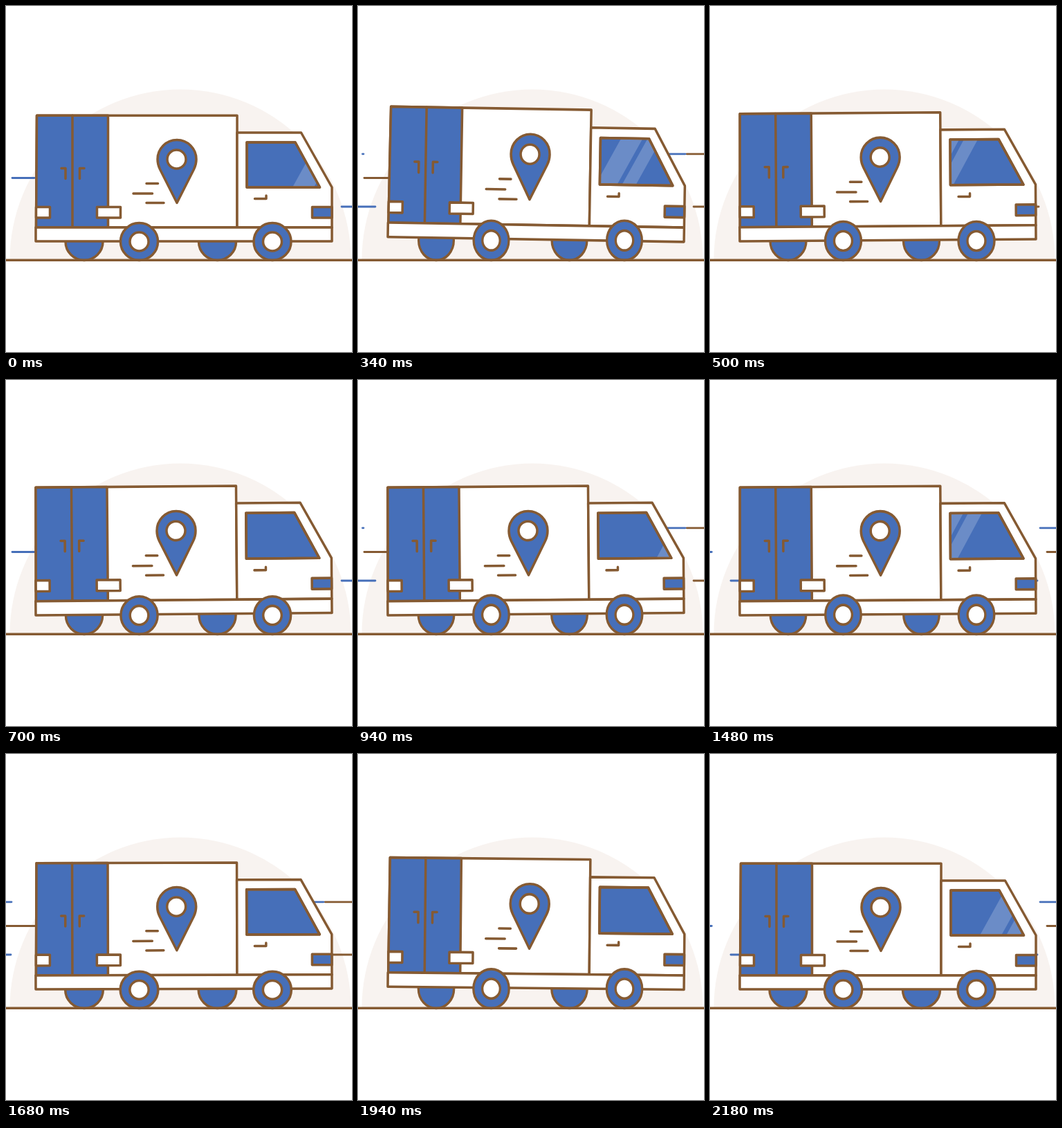
Animation, 500 px wide and 500 px high, one loop 2220 ms. Source, as an HTML page:

```html
<!DOCTYPE html>
<html lang="en">
<head>
<meta charset="utf-8">
<title>Delivery van</title>
<style>
  html, body { margin: 0; width: 100%; height: 100%; overflow: hidden; background: #fff; }
  svg { display: block; width: 100%; height: 100%; }
  .ink { stroke: #855a32; stroke-width: 3.5; stroke-linecap: round; stroke-linejoin: round; }
  .blue { fill: #466fb9; }
  .white { fill: #fff; }
  .none { fill: none; }
  .dash { stroke-width: 2.8; stroke-linecap: round; }
</style>
</head>
<body>
<svg viewBox="0 0 500 500">
  <defs>
    <clipPath id="pane"><path d="M348 197H418L453.5 262H348Z"/></clipPath>
  </defs>

  <path d="M5.5 367a246.5 246.5 0 0 1 493 0Z" fill="#f8f3f0"/>
  <g id="dashes"></g>

  <g class="ink blue">
    <circle class="wheel" cx="113" cy="340.5" r="27"/>
    <circle class="wheel" cx="305.5" cy="340.5" r="27"/>
  </g>

  <g id="body" class="ink">
    <path class="white" d="M44.5 158.300H334V320H43.500Z"/>
    <path class="blue" d="M44.5 158.300H147.500V320H43.500Z"/>
    <path class="none" d="M96 158.300V320M80 234.500H86V249.500M113 234.500H106.500V249.500"/>
    <path class="white" d="M43.500 290.500H63.500V306H43.500ZM131.500 290.500H165.500V306H131.500Z"/>

    <path class="blue" d="M247 284.500L222.500 236Q219 229 219 221.500a28 28 0 0 1 56 0Q275 229 271.500 236Z"/>
    <circle class="white" cx="246.500" cy="221.500" r="13.500"/>
    <path class="none" d="M203 256.500H219.500M184 271H211.500M203 284.500H228"/>

    <path class="white" d="M334 183H426.500L471 262V320H334Z"/>
    <path class="blue" d="M348 197H418L453.500 262H348Z"/>
    <g clip-path="url(#pane)" stroke="none">
      <path id="glare" d="M0 262h31l36 -65h-31ZM38 262h20l36 -65h-20Z" fill="#fff" fill-opacity=".2"/>
    </g>
    <path class="none" d="M348 197H418L453.500 262H348Z"/>
    <path class="none" d="M359.500 278.500H376V274"/>
    <path class="blue" d="M442.500 290.500H471V306H442.500Z"/>
    <path class="white" d="M43 320H471V340H43Z"/>
  </g>

  <g class="ink">
    <g class="wheel"><circle class="blue" cx="192.500" cy="340.500" r="27"/><circle class="white" cx="192.500" cy="340.500" r="13.500"/></g>
    <g class="wheel"><circle class="blue" cx="385" cy="340.500" r="27"/><circle class="white" cx="385" cy="340.500" r="13.500"/></g>
  </g>
  <path class="ink" d="M-4 367.300H504"/>
</svg>

<script>
const LOOP = 2220, STEP = 40, GROUND = 368;
const BLUE = '#466fb9', BROWN = '#855a32';

// Each run starts at a time and step, then rests on its last step.
const runs = [[0, 0, 6], [340, 6, 24], [1400, 30, 11], [1940, 41, 7]];

// Sway cycle: phase, tilt in degrees, body stretch, wheel stretch
const SWAY = 11.25;
const sway = [
  [0, 0, 0, 0], [2, 0, 0, 0],
  [3.25, -.15, .003, -.012], [3.75, -.48, .016, .015],
  [5, .9, .036, .05], [5.6, 1.02, .04, .06], [6, .95, .037, .06],
  [6.5, .88, .031, .05], [9.75, -.48, .016, .045], [SWAY, 0, 0, 0]
];

// Wind dashes: y, colour, front x at phase, phase, speed, length, right limit
const WIND = 15;
const wind = [
  [248.5, BLUE, 8, 0, 19.3, 34],
  [248.5, BROWN, 8, 6, 25, 70],
  [290, BLUE, 29, 2, 18, 69],
  [213.8, BLUE, 5.5, 6, 14, 40, 9],
  [213.8, BROWN, 530, 2, 14, 60],
  [213.8, BLUE, 476, 2, 14, 54],
  [248.5, BROWN, 486, 2, 25, 70],
  [290, BLUE, 484, 0, 14, 18],
  [290, BROWN, 484, 6, 17, 60]
];

const pick = id => document.getElementById(id);
const wrap = (v, n) => ((v % n) + n) % n;
const body = pick('body'), glare = pick('glare');

const wheels = [...document.querySelectorAll('.wheel')].map(el => {
  const rim = el.matches('circle') ? el : el.querySelector('circle');
  return { el, x: +rim.getAttribute('cx') };
});

const dashes = wind.map(([y, colour]) => {
  const line = document.createElementNS('http://www.w3.org/2000/svg', 'line');
  line.setAttribute('class', 'dash');
  line.setAttribute('stroke', colour);
  line.setAttribute('y1', y);
  line.setAttribute('y2', y);
  return pick('dashes').appendChild(line);
});

function stepAt(ms) {
  const [start, first, count] = runs.filter(r => r[0] <= ms).pop();
  return first + Math.min(Math.floor((ms - start) / STEP), count - 1);
}

function swayAt(phase) {
  const i = sway.findIndex(key => key[0] > phase);
  const a = sway[i - 1], b = sway[i];
  const u = (phase - a[0]) / (b[0] - a[0]);
  return a.map((v, j) => v + (b[j] - v) * u).slice(1);
}

function draw(step) {
  const [tilt, stretch, squeeze] = swayAt(wrap(step, SWAY));
  const pivot = tilt > 0 ? 420 : 43;
  body.setAttribute('transform',
    `rotate(${tilt} ${pivot} 340) translate(0 340) scale(1 ${1 + stretch}) translate(0 -340)`);

  for (const { el, x } of wheels) {
    el.setAttribute('transform',
      `translate(${x} ${GROUND}) scale(${1 - squeeze} ${1 + squeeze}) translate(${-x} ${-GROUND})`);
  }

  const sweep = wrap(step + 3.5, 22.5) - 3.5;
  glare.setAttribute('transform', `translate(${414 - 12 * sweep} 0)`);

  wind.forEach(([, , x, at, speed, length, limit = 999], i) => {
    const phase = wrap(step - at + WIND / 2, WIND) - WIND / 2;
    const front = x - speed * phase;
    const tail = Math.min(front + length, limit);
    const line = dashes[i];
    line.setAttribute('visibility', tail > front ? 'visible' : 'hidden');
    line.setAttribute('x1', front + 1);
    line.setAttribute('x2', tail - 1);
  });
}

const began = performance.now();
function tick() {
  draw(stepAt((performance.now() - began) % LOOP));
  requestAnimationFrame(tick);
}
tick();
</script>
</body>
</html>
```
